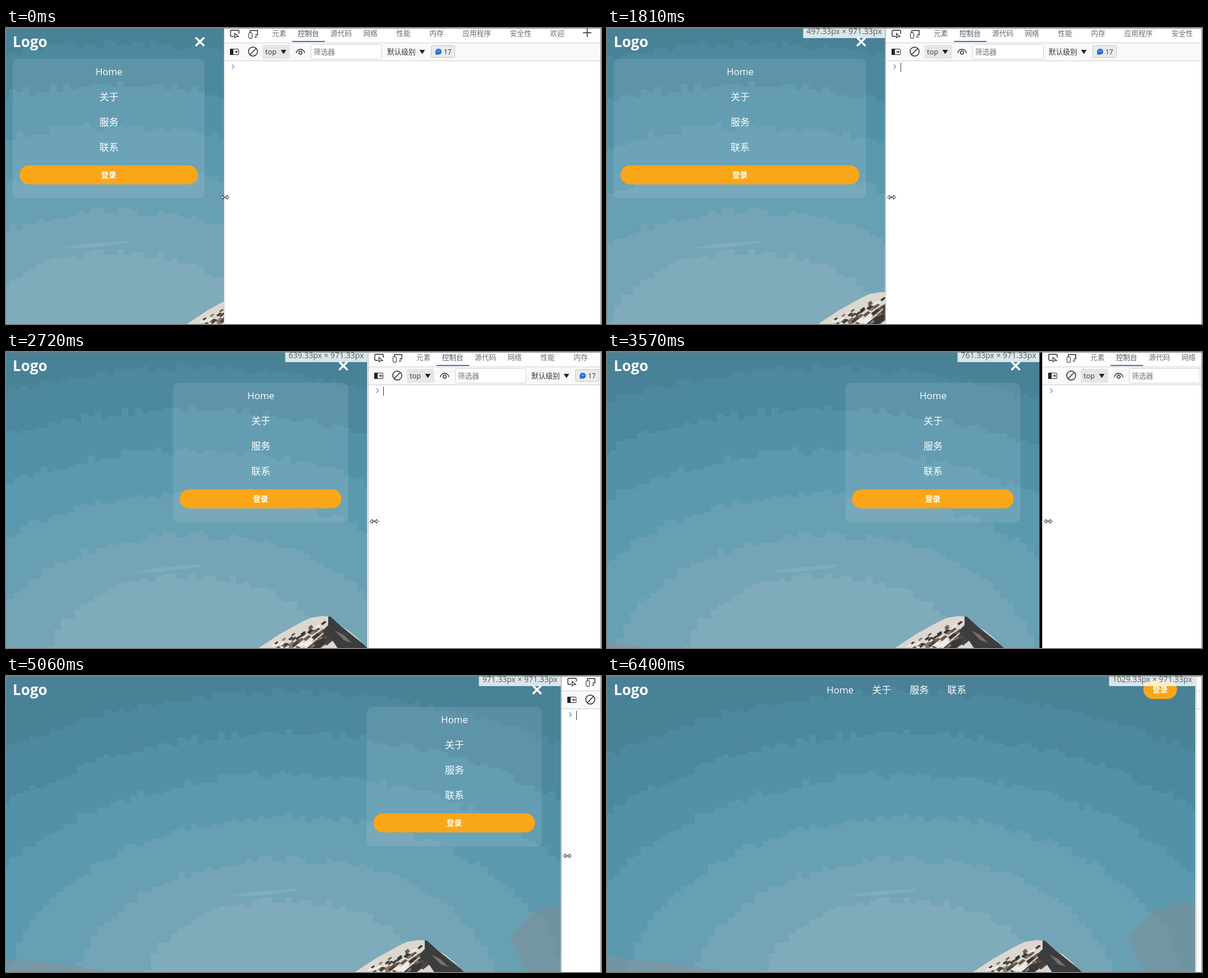
An HTML page with a canvas that plays this animation: 1060x528 px, repeating every 7110 ms.

```html
<!DOCTYPE html>
<html lang="zh">
<head>
<meta charset="utf-8">
<title>Responsive navbar</title>
<style>
html, body { margin: 0; overflow: hidden; background: #fff; }
canvas { display: block; }
</style>
</head>
<body>
<canvas id="stage" width="1060" height="528"></canvas>
<script>
const LOOP = 7110, WIDTH = 1060, HEIGHT = 528;
const DRAG_START = 403, STEP = 135.7, LAST_STEP = 43;
const INK = '#222';
const FONT = '"Open Sans", "Noto Sans CJK SC", "Noto Sans CJK", sans-serif';
const ctx = document.getElementById('stage').getContext('2d');

// The drag: step, left edge of the panel, page width shown in the label.
const DRAG = [
  [0, 388, 381.33], [2, 390, 384], [4, 402, 398], [10, 496, 497.33], [17, 645, 639.33],
  [23, 775, 761.33], [29, 879, 862], [34, 989, 971.33], [LAST_STEP, 1049, 1029.33]
];

const clamp = (v, low, high) => Math.max(low, Math.min(high, v));

function dragAt(step) {
  const n = clamp(step, 0, LAST_STEP);
  const i = Math.max(1, DRAG.findIndex(k => k[0] >= n));
  const a = DRAG[i - 1], b = DRAG[i], u = (n - a[0]) / (b[0] - a[0]);
  const [, panel, reported] = a.map((v, j) => v + (b[j] - v) * u);
  // the page repaints late while the drag is fast
  const lag = clamp(Math.min((n - 15) * 0.75, 34 - n), 0.5, 4.5);
  return {
    panel, reported,
    width: n ? panel - lag : panel,
    cursorX: panel + 2 + Math.min(n, 9),
    cursorY: 302 + 2.1 * Math.max(0, n - 25)
  };
}

function rect(x, y, w, h, color, c = ctx) {
  c.fillStyle = color;
  c.fillRect(x, y, w, h);
}
function box(x, y, w, h, r, fill, stroke) {
  ctx.beginPath();
  ctx.roundRect(x, y, w, h, r);
  if (fill) { ctx.fillStyle = fill; ctx.fill(); }
  if (stroke) { ctx.strokeStyle = stroke; ctx.lineWidth = 1; ctx.stroke(); }
}
function shape(d, color, c = ctx) {
  c.fillStyle = color;
  c.fill(new Path2D(d));
}
function line(d, width, color) {
  ctx.strokeStyle = color;
  ctx.lineWidth = width;
  ctx.stroke(new Path2D(d));
}
function circle(x, y, r, width, color) {
  ctx.beginPath();
  ctx.arc(x, y, r, 0, 7);
  ctx.strokeStyle = color;
  ctx.lineWidth = width;
  ctx.stroke();
}
function setFont(size, weight = 400) {
  ctx.font = `${weight} ${size}px ${FONT}`;
}
function text(s, x, y, size, color, align = 'left', weight = 400) {
  setFont(size, weight);
  ctx.textAlign = align;
  ctx.fillStyle = color;
  ctx.fillText(s, x, y);
}

// Backdrop, drawn once and kept centred in the page.
const sky = document.createElement('canvas');
sky.width = 1048;
sky.height = HEIGHT;

let seed = 7;
const random = () => (seed = seed * 16807 % 2147483647) / 2147483647;

function paintSky(c) {
  const bands = 6;
  rect(0, 0, 1048, HEIGHT, 'hsl(197 35% 44%)', c);
  for (let i = 0; i < bands; i++) {
    const u = i / (bands - 1), ry = 532 - 372 * u, rx = ry * 1.6;
    for (let x = 0; x < 1048; x += 12) {
      const d = (x - 524) / rx;
      if (Math.abs(d) >= 1) continue;
      const top = 560 - ry * Math.sqrt(1 - d * d) + (random() - 0.5) * 14;
      rect(x, Math.round(top / 5) * 5, 12, HEIGHT, `hsl(196 ${35 - 5 * u * u}% ${46 + 15.5 * u}%)`, c);
    }
  }
  shape('M428 393l42-8 82-6-7 5-65 8z', '#82acba', c);
  shape('M0 500l45 6 85 8 85 14H0z', 'rgba(135 145 150 / .5)', c);
  shape('M1048 400l-70 15-50 50 30 63h90z', 'rgba(125 145 152 / .6)', c);
}

function paintMountain(c) {
  const outline = new Path2D(
    'M652 528l38-25 40-22 15-7 20-3 15 1 20 18 12 7 16 13 18 18z');
  c.save();
  c.clip(outline);
  rect(640, 460, 220, 68, '#dcd7d0', c);
  const tones = ['#4b433e', '#8c7563', '#38373a', '#efebe5', '#6b5a4d'];
  for (let i = 0; i < 90; i++) {
    const x = 655 + 125 * random(), depth = 5 + 45 * random();
    const y = 528 - (x - 652) * 0.5 + depth, size = 2 + depth / 9;
    shape(`M${x} ${y}l${size * 2} ${-size * 1.5} ${size} ${size / 2} ${-size * 2.2} ${size * 1.8}z`,
      tones[i % tones.length], c);
  }
  shape('M776 470l8 3 16 17 50 40h-56l-10-15-14-10-4-8 10-10z', '#3c3d3f', c);
  shape('M788 497l16 8 14 14-14-5z', '#77716b', c);
  c.restore();
}

function loginButton(x, y, w) {
  box(x, y, w, 34, 17, '#faa619');
  text('登录', x + w / 2, y + 22, 13.5, '#fff', 'center', 700);
}

function drawNav(links, width) {
  const gap = 33;
  setFont(17, 500);
  const widths = links.map(s => ctx.measureText(s).width);
  const total = widths.reduce((a, b) => a + b, gap * (links.length - 1));
  let x = (width - 17 - total) / 2;
  links.forEach((s, i) => {
    text(s, x, 30.5, 17, '#fff', 'left', 500);
    x += widths[i] + gap;
  });
  loginButton(width - 93, 7, 60);
}

function drawMenu(links, width, reported) {
  const right = width - 34, left = reported > 576 ? right - 312 : 12;
  box(left, 55, right - left, 249, 10, 'rgba(255,255,255,.1)');
  links.forEach((s, i) =>
    text(s, (left + right) / 2 + 0.5, 84 + i * 45, 17, '#fff', 'center', 500));
  loginButton(left + 12, 245, right - left - 24);
  ctx.lineCap = 'round';
  line(`M${right - 15} 18l13 13m0-13l-13 13`, 3.6, '#fff');
  ctx.lineCap = 'butt';
}

function drawSizeLabel(width, reported) {
  const px = v => +(Math.round(v * 1.5) / 1.5).toFixed(2) + 'px';
  const label = `${px(reported)} × ${px(971.33)}`;
  setFont(14);
  const w = ctx.measureText(label).width + 12;
  rect(width - w, 0, w, 18, 'rgba(255,255,255,.8)');
  text(label, width - 6, 11, 14, '#5a5d60', 'right');
}

function drawPage(width, reported, resizing) {
  const links = ['Home', '关于', '服务', '联系'];
  ctx.save();
  ctx.beginPath();
  ctx.rect(0, 0, width, HEIGHT);
  ctx.clip();
  ctx.drawImage(sky, Math.round((width - 1048) / 2), 0);
  text('Logo', 12, 34, 26, '#fff', 'left', 700);
  if (reported >= 992) drawNav(links, width);
  else drawMenu(links, width, reported);
  if (resizing) drawSizeLabel(width, reported);
  ctx.restore();
}

function drawTabs() {
  const tabs = ['元素', '控制台', '源代码', '网络', '性能', '内存', '应用程序', '安全性', '欢迎'];
  let x = 86;
  tabs.forEach((name, i) => {
    text(name, x, 14, 12.7, i === 1 ? '#4a4d52' : '#6b6b6b');
    x += ctx.measureText(name).width + (i < 3 ? 20.3 : 33.6);
  });
  rect(122, 23, 58, 2, '#3273d9');
  line('M640 8.5h15M647.5 1v15', 1.5, INK);
  // inspect and device icons
  line('M18 15h-4a2 2 0 0 1-2-2v-7a2 2 0 0 1 2-2h11a2 2 0 0 1 2 2v4', 1.4, INK);
  line('M19.5 9.5v8l2.500-2h4z', 1.2, INK);
  line('M47 8v-3.500h13v8h-4M55 16h4', 1.4, INK);
  box(44.5, 8.5, 6, 10, 1.5, '#fff', INK);
}

function drawToolbar() {
  rect(0, 26, 700, 33, '#f9f9f9');
  rect(0, 26, 700, 1, '#d0d0d0');
  rect(0, 58, 700, 1, '#ccc');

  box(11.5, 37.5, 15, 10, 1.5, '#fff', INK);
  rect(11, 37, 6, 11, INK);
  line('M19 42.5h5M22 40.500l2 2-2 2', 1.2, INK);
  circle(52, 42, 8, 1.4, INK);
  line('M46.500 47.500l11-11', 1.4, INK);

  box(69, 30, 49, 25, 2, '#e6e6e6');
  text('top', 74, 47, 12.7, '#333');
  for (const x of [101.5, 348.5]) shape(`M${x} 39h10l-5 7.500z`, INK);
  line('M129 45a7.500 7 0 0 1 15 0', 1.3, INK);
  circle(136.5, 44, 2.8, 1.3, INK);

  box(155.5, 29.5, 126, 26, 3, '#fff', '#d0d0d0');
  text('筛选器', 160, 47, 12.7, '#757575');
  text('默认级别', 291, 47, 12.7, '#333');
  box(369.5, 31.5, 42, 21, 2, '#ebebeb', '#c4c4c4');
  box(377, 37, 11, 10.5, [5, 5, 5, 0], '#2f6fde');
  rect(380, 41, 5, 1, '#a9c5f5');
  text('17', 392, 46.5, 12, '#333');
}

function drawPanel(x, caret) {
  ctx.save();
  ctx.translate(x, 0);
  rect(0, 0, 700, HEIGHT, '#fff');
  drawTabs();
  drawToolbar();
  line('M14.500 65l4 4-4 4', 1.4, '#5d9bdb');
  if (caret) rect(27, 62, 1, 16, '#333');
  rect(0, 0, 1, HEIGHT, '#b4b8ba');
  ctx.restore();
}

function drawCursor(x, y) {
  const arrow = `M${x - 7.5} ${y}l4-3.500v2.500h7v-2.500l4 3.500-4 3.500v-2.500h-7v2.500z`;
  shape(arrow, '#fff');
  line(arrow, 1, INK);
}

function draw(time) {
  const step = Math.floor((time % LOOP - DRAG_START) / STEP);
  const { panel, width, reported, cursorX, cursorY } = dragAt(step);
  const caret = step >= 0 && (step < 22 || step > 25) && step < LAST_STEP;
  rect(0, 0, WIDTH, HEIGHT, panel - width > 3 ? '#000' : '#fff');
  drawPage(width, reported, step > 0);
  drawPanel(Math.round(panel), caret);
  rect(0, 0, WIDTH, 1, '#7b7f81');
  rect(WIDTH - 1, 0, 1, HEIGHT, '#8c8c8c');
  if (step <= LAST_STEP) drawCursor(cursorX, cursorY);
}

paintSky(sky.getContext('2d'));
paintMountain(sky.getContext('2d'));
const start = performance.now();
(function loop() {
  draw(performance.now() - start);
  requestAnimationFrame(loop);
})();
</script>
</body>
</html>
```
